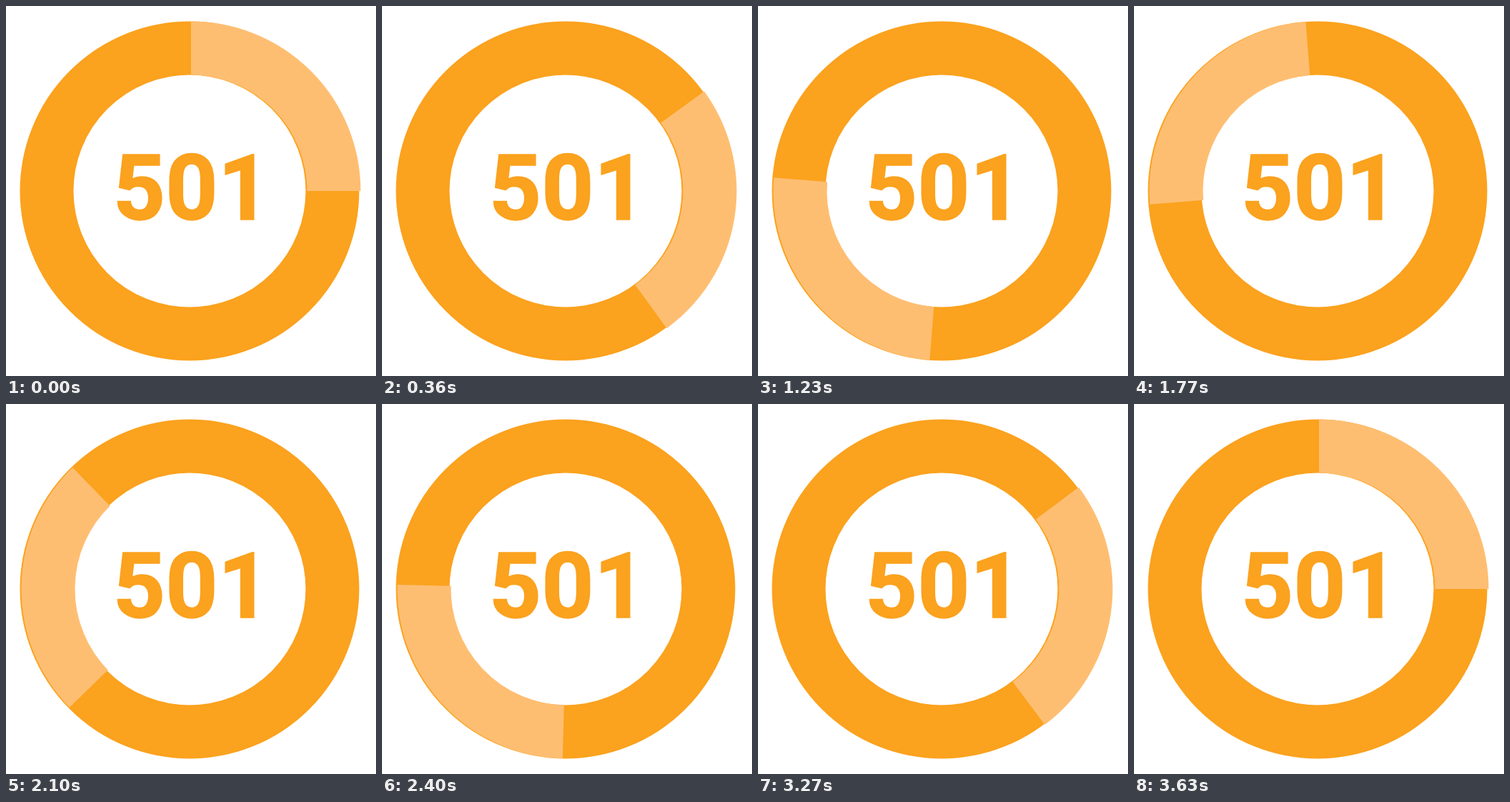
These frames come from a looping animation (518 by 518 pixels, 3660 ms). An HTML page with a canvas:

```html
<!DOCTYPE html>
<html lang="en">
<head>
<meta charset="utf-8">
<title>Counter ring</title>
<style>
  html, body { margin: 0; width: 100%; height: 100%; overflow: hidden; background: #fff; }
  canvas { display: block; width: 518px; height: 518px; }
</style>
</head>
<body>
<canvas id="stage" width="518" height="518"></canvas>
<script>
const ctx = document.getElementById('stage').getContext('2d');
const ORANGE = '#fba21e', PEACH = '#febe72';
const STEP = 30, FORWARD_STEPS = 60, BACK_STEPS = 61, LOOP_STEPS = 122;
const QUARTER = Math.PI / 2, SWEEP = 3 * QUARTER;
const start = performance.now();

function ring(x, color, from, to) {
  ctx.beginPath();
  ctx.arc(x, 259, 200, from, to);
  ctx.lineWidth = 75;
  ctx.strokeStyle = color;
  ctx.stroke();
}

function label() {
  ctx.font = '700 128px Roboto, sans-serif';
  ctx.textAlign = 'center';
  ctx.textBaseline = 'alphabetic';
  ctx.fillStyle = ctx.strokeStyle = ORANGE;
  ctx.lineWidth = 1.5;
  ctx.fillText('501', 260, 299.2);
  ctx.strokeText('501', 260, 299.2);
}

// Three quarters of a turn clockwise, then back at a slightly slower pace.
function turnAt(ms) {
  const step = Math.floor((ms + 1) / STEP) % LOOP_STEPS;
  const part = step <= FORWARD_STEPS
    ? step / FORWARD_STEPS
    : (FORWARD_STEPS + BACK_STEPS - step) / BACK_STEPS;
  return SWEEP * part;
}

function draw() {
  const turn = turnAt(performance.now() - start);
  ctx.fillStyle = '#fff';
  ctx.fillRect(0, 0, 518, 518);
  ring(257, ORANGE, 0, 4 * QUARTER);
  ring(259, PEACH, turn - QUARTER, turn);
  label();
  requestAnimationFrame(draw);
}

draw();
</script>
</body>
</html>
```
